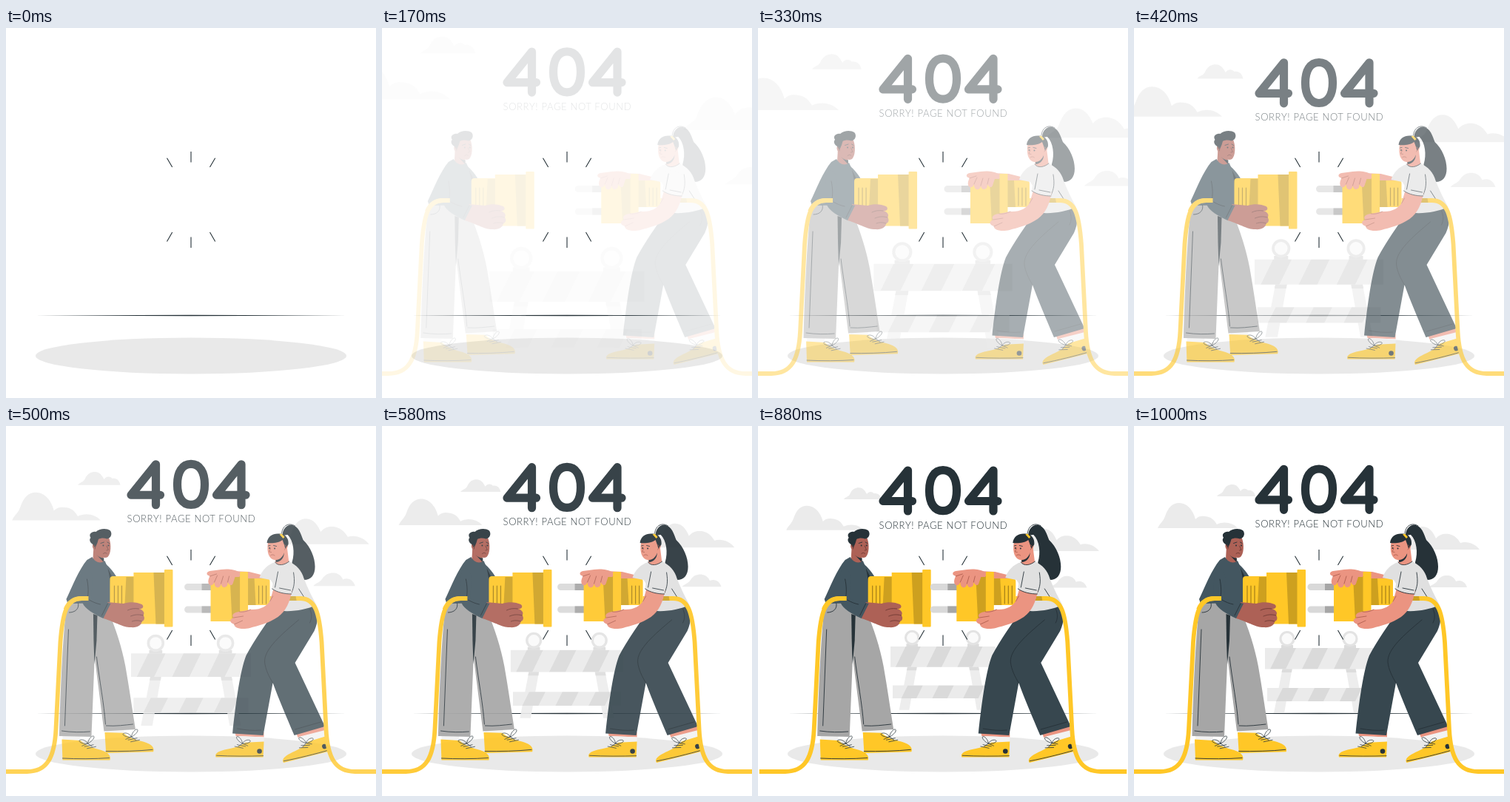
An HTML page for the animation above (1040 ms loop, 500 by 500 pixels).

```html
<!DOCTYPE html>
<html lang="en">
<head>
<meta charset="utf-8">
<title>404</title>
<style>
  html, body { margin: 0; width: 100%; height: 100%; overflow: hidden; background: #fff; }
  svg { display: block; width: 100%; height: 100%; --p: 0; --rest: calc(1 - var(--p)); }
  .enter { opacity: var(--p); }
  #title { transform: translateY(calc(var(--rest) * -30px)); }
  #man { transform: translateX(calc(var(--rest) * -30px)); }
  #woman { transform: translateX(calc(var(--rest) * 30px)); }
  #backdrop { transform-origin: 250px 233.5px; transform: scale(calc(1 + var(--rest) * .5)); }
  text { font: 300 13px Lato, "Open Sans", sans-serif; letter-spacing: .65px; fill: #263238; }
  .ink { fill: #263238; }
  .line { fill: none; stroke: #263238; stroke-width: .9; stroke-linecap: round; stroke-linejoin: round; }
  .digits { fill: none; stroke: #263238; stroke-width: 11.2; stroke-linecap: round; stroke-linejoin: round; }
  .cable { fill: none; stroke: #ffc727; stroke-width: 5.8; }
  .yellow { fill: #ffc727; }
  .ochre { fill: #cda01f; }
  .rib { fill: none; stroke: #a37f18; stroke-width: 1.2; stroke-linecap: round; }
  .brown { fill: #ad6156; }
  .brownline { fill: none; stroke: #6f3934; stroke-width: .9; stroke-linecap: round; }
  .peach { fill: #eb9481; }
  .peachline { fill: none; stroke: #a9584a; stroke-width: .8; stroke-linecap: round; }
  .knit { fill: #435660; }
  .shirt { fill: #e0e0e0; }
  .grey { fill: #a6a6a6; }
  .slate { fill: #37474f; }
  .cloud { fill: #ebebeb; }
</style>
</head>
<body>
<svg viewBox="0 0 500 500">
  <defs>
    <g id="shoe">
      <path class="yellow" d="M0 0L25 1.500C30 6 37 10 46 12.500C56 15 65 18 65.500 25L65 28L1 28Z"/>
      <path class="line" d="M1 25.500C20 26.500 45 26.500 64 25"/>
    </g>
    <g id="bow" class="line">
      <path d="M0 0C-5 -9 -16 -6 -13 -3C-10 0 -4 1 0 0C1 -8 8 -14 10 -11C11 -8 5 -2 0 0L7 5M0 0L-9 4M-5 5L9 2M-1 8L13 5"/>
    </g>
    <clipPath id="topboard"><path d="M177 300H323V328.500H177Z"/></clipPath>
    <clipPath id="lowboard"><path d="M180 354H320V372H180Z"/></clipPath>
  </defs>

  <ellipse cx="250" cy="443" rx="210" ry="24.500" fill="#e9e9e9"/>
  <path class="ink" d="M40 388.500L250 387.800L460 388.500L250 389.200Z"/>

  <g id="backdrop" class="enter">
    <path class="cloud" d="M32 138C35 131 39 130 42 122C46 110 52 104 61 104C72 104 80 114 83 126C88 121 93 121.500 99 122.500C106 124 109 128 112 133C122 128 134 131 140 138Z"/>
    <path class="cloud" d="M112 95C115 91 119 92 121 87C124 81 128 79 133 79C139 79 142 84 144 88C147 84 151 84 154 87C160 86 163 90 164 95Z"/>
    <path class="cloud" d="M359 167C364 160 369 161 372 154C376 142 382 136 390 136C400 136 405 145 408 152C413 146 419 145 426 146C434 148 438 153 441 158C450 155 461 159 467 167Z"/>
    <path class="cloud" d="M399 218C402 214 407 214 410 209C414 203 419 201.500 425 202C431 203 434 207 435 210C442 207 448 211 450 218Z"/>
    <path fill="#ededed" d="M201 326H214L203 388H189ZM286 326H299L311 388H297Z"/>
    <path fill="#dcdcdc" d="M201 326H214L213 333H199.500ZM286 326H299L300.500 333H287ZM199 296H215V301H199ZM284 296H300V301H284Z"/>
    <g fill="#fafafa" stroke="#e3e3e3" stroke-width="3.200">
      <circle cx="207" cy="287.500" r="9"/><circle cx="292" cy="287.500" r="9"/>
    </g>
    <path fill="#ebebeb" d="M177 300H323V328.500H177ZM180 354H320V372H180Z"/>
    <path clip-path="url(#topboard)" fill="#dadada" d="M198 300H219L205 328.500H184ZM241 300H262L248 328.500H227ZM284 300H305L291 328.500H270Z"/>
    <path clip-path="url(#lowboard)" fill="#dadada" d="M201 354H222L213 372H192ZM244 354H265L256 372H235ZM287 354H308L299 372H278Z"/>
  </g>

  <g id="title" class="enter">
    <g class="digits" role="img" aria-label="404">
      <path id="four" d="M202.500 113.300V58.300L169 99.800H208.500"/>
      <path d="M250 58C262 58 268.500 69 268.500 85.500S262 113 250 113S231.500 102 231.500 85.500S238 58 250 58Z"/>
      <use href="#four" x="115.500"/>
    </g>
    <text x="250.400" y="137" text-anchor="middle">SORRY! PAGE NOT FOUND</text>
  </g>

  <g id="man" class="enter">
    <!-- legs and shoes -->
    <path fill="#f2f2f2" d="M83 417H107V425H83ZM142 409H166V417H142Z"/>
    <use href="#shoe" transform="translate(140 414) rotate(-1.500)"/>
    <use href="#bow" transform="translate(176 420) scale(.85)"/>
    <use href="#shoe" transform="translate(82 423.500)"/>
    <use href="#bow" transform="translate(117 429) scale(.85)"/>
    <path class="grey" d="M118 238L145 250C155 275 163 298 168 325C173 353 177 382 181.500 410L139 412.500L126 310Z"/>
    <path class="grey" d="M90 236L126 240C128 262 126 300 126 320L122 420L78.500 419C80 360 83 290 88 245Z"/>
    <path class="ink" d="M124.500 254L130 256L129 290L126 322L125 290Z"/>
    <path class="line" d="M82 412C95 414 109 414 120 413M129 312C133 345 139 375 141 403M142 405C155 406 168 404 178 403M104 239C106 247 100 252 92 252M91 275L86 405"/>
    <!-- far sleeve -->
    <path class="knit" d="M136 183C145 188 151 196 156 204L149 228L135 230Z"/>
    <path class="ink" d="M144 192L150 204L148 221C144 215 143 206 144 192Z"/>
    <!-- head -->
    <path class="brown" d="M125 162L124 180C128 189 137 189 139 183L138 176Z"/>
    <path class="ink" d="M129 174C133 178 137 179 139 178.500L138.500 184Z"/>
    <path class="brown" d="M127 154C132 148 143 147 146 152C149 160 148.500 173 144 177C139 180 132 176 129 168C124 169 121 160 126 158Z"/>
    <path class="ink" d="M127 165L124 160C120 158 118.500 153 121 151C117.500 146 123 142 128 143C133 138 143 138 147 141C151 145 148.500 152 143 152.500C139 151 135 151 131.500 153L130 158Z"/>
    <path class="brownline" d="M125 161C127 160 127.500 163 127 166M142.500 162L145 167.500L142.500 168M138 172.500C139.500 171 142 171 143 172.500"/>
    <path class="line" d="M134.500 158.500L139 157M143.500 157L146 158.500"/>
    <circle class="ink" cx="138" cy="161.500" r="1"/><circle class="ink" cx="145" cy="161.500" r="1"/>
    <!-- torso -->
    <path class="knit" d="M123 177C127 184 134 187 140 182C146 194 149 212 148 239L90 240L88 234C96 217 105 194 116 181Z"/>
    <path class="cable" d="M120 233H109C88 233 83 253 80 292L74 410C72 448 62 467 35 467H0"/>
    <!-- plug -->
    <path class="yellow" d="M151 203H182V243H147V207Q147 203 151 203Z"/>
    <path class="ochre" d="M169 204H180V242H167Z"/>
    <path class="rib" d="M153 216V240M158 216V240M163 216V240"/>
    <path class="yellow" d="M179 198H222V267.500H179Z"/>
    <path class="ochre" d="M206 198H221V267.500H209Z"/>
    <rect class="yellow" x="220.500" y="194" width="11.500" height="77.500" rx="1"/>
    <!-- near arm -->
    <path class="brown" d="M144 238L165 240C174 237 184 238 190 241C194 244 191 248 186 247C191 248 195 252 192 256C195 259 193 264 190 264C190 269 184 273 175 272C164 272 157 266 138 260Z"/>
    <path class="brownline" d="M186 247C180 246 175 247 171 249M192 256C185 254 180 255 175 257M190 264C184 262 180 263 177 264"/>
    <path class="knit" d="M112 192C121 191 125 202 123 213L122 233L148 240L138 260C125 254 113 247 110 239C106 227 107 205 112 192Z"/>
    <path class="line" d="M116 207C118 217 118 224 117 231M119 235C124 238 129 240 134 241M144 240L136 256"/>
    <path class="cable" d="M118 233H109C98 233 91 238 87 248"/>
  </g>

  <g id="woman" class="enter">
    <!-- prongs -->
    <path fill="#d9d9d9" d="M239 213H272V222H239A4.500 4.500 0 0 1 239 213ZM239 243.500H272V252.500H239A4.500 4.500 0 0 1 239 243.500Z"/>
    <path class="grey" d="M258 213H272V222H258ZM258 243.500H272V252.500H258Z"/>
    <!-- legs and shoes -->
    <path class="peach" d="M303 414H342V420.500L304 419ZM385 414L422 404L425 412L388 421Z"/>
    <path fill="#f2f2f2" d="M306 419L342 420.500V430H312ZM389 420L424.500 411L427 423L398 431Z"/>
    <g id="left-shoe">
      <use href="#shoe" transform="translate(342 426.500) scale(-1 .75)"/>
      <use href="#bow" transform="translate(313 429) scale(-.8 .8)"/>
      <circle class="ink" cx="336" cy="439.500" r="3.300"/>
    </g>
    <use href="#left-shoe" transform="translate(426.500 419) rotate(-14) translate(-342 -426.500)"/>
    <path class="slate" d="M361 244L411 241C416 250 416 264 410 277L384 320L424.500 406L383 418C372 392 362 369 354 347L341 418L299.500 415.500C304 373 310 330 318 310C330 288 344 268 361 244Z"/>
    <path class="line" d="M389 262C365 282 342 302 343 319C344 329 349 339 354 347M404 247C407 254 407 260 404 266M306 409C318 411 328 412 338 411M384 410L419 400"/>
    <!-- far arm -->
    <path class="peach" d="M342 202L322 197L300 196V212L342 213Z"/>
    <!-- plug -->
    <path class="yellow" d="M270 203H312V264H270Z"/>
    <path class="ochre" d="M296 203H311V264H299Z"/>
    <path class="yellow" d="M318 206H346Q350 206 350 210V242H318Z"/>
    <path class="ochre" d="M320 206H329L331 242H320Z"/>
    <path class="rib" d="M335 216V240M340 216V240M345 216V240"/>
    <rect class="yellow" x="309.500" y="197" width="11" height="67" rx="1"/>
    <path class="peach" d="M309 198C302 193 291 193 284 194L269 196C264 197 264 201 267 202L269 203C266 208 266 213 269 215C272 216 274 214 275 211C275 217 278 219 281 218C283 217 284 215 284 213C285 218 288 219 291 217C293 216 293 213 293 211C295 216 299 216 300 213L303 204L309 204Z"/>
    <path class="peachline" d="M269 203L278 200M275 211L279 202M284 213L287 203M293 211L295 203"/>
    <!-- head -->
    <path class="ink" d="M367 148C367 139 373 133.500 379 133.500C389 135 392 146 395 154C405 163 411 178 411 190C411 201 406 208 396 208C386 206 379 196 380 184C384 171 382 155 374 147Z"/>
    <path class="line" d="M366 145C367 134 376 130 384 135"/>
    <path class="peach" d="M358 174L357 190C362 196 372 194 376 186L373 162Z"/>
    <path class="ink" d="M358 179C363 179 367 176 369 171C370 177 365 184 358 184Z"/>
    <path class="peach" d="M348 155C355 149 367 149 371 156C376 157 375 167 370 168C369 176 363 182 357 181C348 180 345 169 348 155Z"/>
    <path class="ink" d="M346 158C347 149 354 145 362 145.500C370 145 376 151 375 160L371 166C370 162 369 159 367 154C362 158 353 159 346 158Z"/>
    <path fill="#ffc727" d="M363 146.500L366 145.500L370 150L368 152Z"/>
    <path class="peachline" d="M351 165L349 170L352 170.500M351 175C352 173.500 355 173.500 356.500 175M370 161C373 161 373 165 370 167"/>
    <path class="line" d="M355 161.500L359 162.500M348 162L350.500 161.500"/>
    <circle class="ink" cx="356.500" cy="165.500" r="1"/><circle class="ink" cx="349.500" cy="165" r="1"/>
    <!-- shirt -->
    <path class="shirt" d="M357 184C361 190 370 188 376 183C386 188 393 195 396 206C401 219 407 231 413 242C397 249 377 252 358 249L359 221L351 208L336 205C339 195 347 187 357 184Z"/>
    <path class="line" d="M357 184C361 190 370 188 376 183M382 198C384 211 383 217 379 226M389 220L398 234" stroke-width=".6"/>
    <path class="cable" d="M350 233H391C412 233 417 253 420 292L426 410C428 448 438 467 465 467H500"/>
    <path class="ochre" d="M375 230H385L386 236H374Z"/>
    <!-- near arm -->
    <path class="peach" d="M356 216L380 222C377 238 372 250 361 258C348 267 333 270 323 273C310 276 301 272 302 268C295 266 295 261 301 259C297 255 303 251 309 251L324 248C337 249 346 243 350 237Z"/>
    <path class="peachline" d="M302 268L313 263M301 259L314 257M324 248C320 250 315 252 309 251M350 237L354 230"/>
    <path class="shirt" d="M357 193C368 190 381 196 382 207L379 227C369 227 359 224 353 220Z"/>
    <path class="line" d="M361 197L357 218M353 220C360 225 370 227 379 227M363 219L378 222" stroke-width=".6"/>
  </g>

  <path class="line" style="stroke-linecap:butt;stroke-width:1.100" d="M250 167V181.500M217.500 175.800L224.700 188M282.700 175.800L275.500 188M250 282.500V297M224.700 276L217.500 288.500M275.500 276L282.700 288.500"/>
</svg>
<script>
  const stage = document.querySelector("svg");
  const LOOP = 1040, RATE = 24;

  const curve = (a, b, u) => 3 * (1 - u) ** 2 * u * a + 3 * (1 - u) * u * u * b + u ** 3;

  // Overshooting cubic-bezier(.36, -.01, .5, 1.38)
  function ease(x) {
    if (x >= 1) return 1;
    let lo = 0, hi = 1;
    for (let i = 0; i < 24; i++) {
      const mid = (lo + hi) / 2;
      if (curve(.36, .5, mid) < x) lo = mid; else hi = mid;
    }
    return curve(-.01, 1.38, lo);
  }

  // The motion advances in hard steps, after a short empty hold.
  function draw() {
    const ms = performance.now() % LOOP;
    const step = Math.min(RATE, Math.floor((ms + 3.4) * RATE / 1000));
    stage.style.setProperty("--p", step < 3 ? 0 : ease(step / RATE + .02).toFixed(4));
    requestAnimationFrame(draw);
  }
  draw();
</script>
</body>
</html>
```
